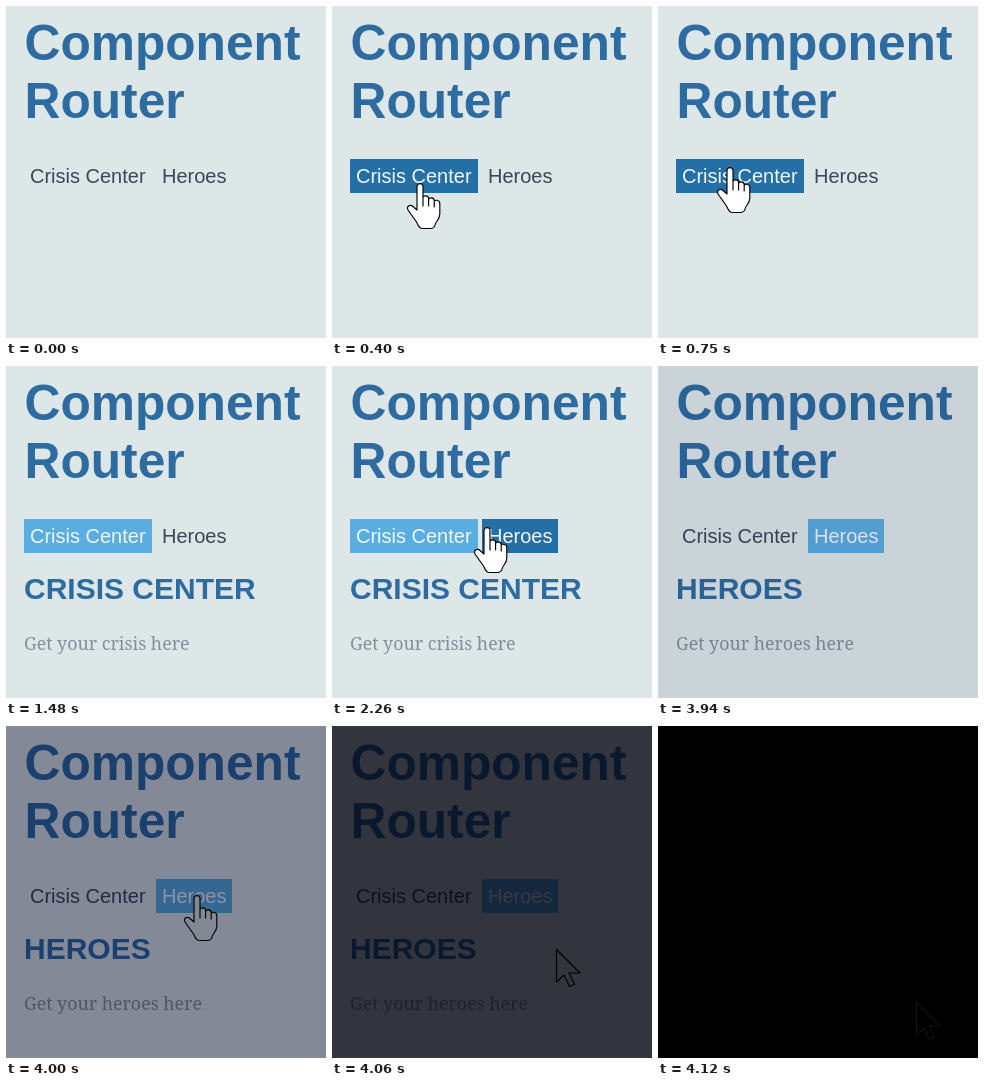
Recreate the animation shown at these times as an HTML page. Size 320 by 332 pixels, loop 4320 ms.

```html
<!DOCTYPE html>
<html lang="en">
<head>
<meta charset="utf-8">
<title>Component Router</title>
<style>
  html, body { margin: 0; width: 100%; height: 100%; overflow: hidden; background: #dde7e7; }
  svg { display: block; width: 320px; height: 332px; font-family: "Liberation Sans", Arial, sans-serif; }
  .head { font-weight: bold; fill: #2d6ba1; }
  .title { font-size: 49.7px; }
  .page { font-size: 30px; }
  .note { font: 17.8px "Noto Serif", Cambria, serif; fill: #83909c; }
  .link { font-size: 20px; fill: #3c4658; }
  .link rect { fill: none; }
  .link.hover, .link.active { fill: #f1f6fa; }
  .link.hover rect { fill: #2470a6; }
  .link.active rect { fill: #5aade0; }
  #cursor path { stroke-width: 1.15; stroke-linejoin: round; stroke-linecap: round; }
</style>
</head>
<body>
<svg viewBox="0 0 320 332">
  <rect width="320" height="332" fill="#dde7e7"/>
  <g class="head title">
    <text x="18.5" y="54">Component</text>
    <text x="18.5" y="112">Router</text>
  </g>
  <g class="link"><rect x="18" y="153" width="128" height="34"/><text x="24" y="177">Crisis Center</text></g>
  <g class="link"><rect x="150" y="153" width="76" height="34"/><text x="156" y="177">Heroes</text></g>
  <text id="page" class="head page" x="18" y="232.5"></text>
  <text id="note" class="note" x="18" y="284"></text>
  <rect id="shade" width="320" height="332" opacity="0"/>
  <g id="cursor">
    <path id="arrow" d="M.5 .5V33L8 26L13.5 37.5L18.5 35.2L13 24H24Z"/>
    <path id="hand" transform="translate(-13.5 0)" d="M10.5 27V3.6a3 3 0 0 1 6 0V15c0-3 5.6-3 5.6.6V17c0-3 5.6-2.8 5.6.8V19c0-2.6 5.6-2.4 5.6 1.4V31c0 6-4 7-4.6 10.500c-.6 3-2 4-5 4H16c-4 0-4-3-6-6.500L1.500 27c-2-4 2.500-6 5-3.500ZM16.500 15v8M22.100 17v6M27.700 19v5"/>
  </g>
</svg>
<script>
const LOOP = 4320, STEP = 30, FADE = 3940;
const $ = id => document.getElementById(id);

// time, x, y of the pointer tip
const track = [
  [0, 223, 295], [30, 223, 295], [180, 160, 240], [330, 100, 187], [450, 76, 166], [550, 71, 161],
  [749, 71, 161], [750, 72, 161], [2050, 72, 161],
  [2080, 76, 157], [2140, 98, 146], [2260, 154.5, 161], [2400, 184, 162], [2540, 187.5, 162],
  [3970, 187.5, 162], [4000, 190.5, 169], [4120, 258, 276], [LOOP, 258, 276]
];
const shown = [[30, 1180], [2080, 2640], [3970, LOOP]];
const pages = [
  { start: 1480, head: "CRISIS CENTER", note: "Get your crisis here" },
  { start: 2940, head: "HEROES", note: "Get your heroes here" }
];
const links = [...document.querySelectorAll(".link")].map(el => {
  const r = el.firstChild;
  return { el, x: +r.getAttribute("x"), w: +r.getAttribute("width") };
});

function pointer(t) {
  const i = track.findIndex(k => k[0] > t) - 1;
  const [t0, x0, y0] = track[i], [t1, x1, y1] = track[i + 1];
  const p = Math.floor((t - t0) / STEP) * STEP / (t1 - t0);
  return [Math.round(x0 + (x1 - x0) * p), Math.round(y0 + (y1 - y0) * p)];
}

// seven steps to black, slow at both ends
function darkness(t) {
  if (t < FADE) return 0;
  const p = Math.min(1, (Math.floor((t - FADE) / STEP) + 1) / 7);
  return 1 - (1 - p ** 1.5) ** 1.6;
}

function draw(t) {
  const [x, y] = pointer(t);
  const current = pages.filter(p => t >= p.start).length - 1;
  const over = links.findIndex(l => x >= l.x && x < l.x + l.w && y >= 153 && y < 187);
  links.forEach(({ el }, i) => {
    el.classList.toggle("active", i === current);
    el.classList.toggle("hover", i === over && i !== current);
  });

  const page = pages[current] || { head: "", note: "" };
  $("page").textContent = page.head;
  $("note").textContent = page.note;

  const dark = darkness(t), lit = 1 - dark;
  $("shade").setAttribute("opacity", dark);
  $("shade").setAttribute("fill", `rgb(0,0,${60 * lit})`);

  const cursor = $("cursor");
  cursor.setAttribute("visibility", shown.some(([a, b]) => t >= a && t < b) ? "visible" : "hidden");
  cursor.setAttribute("transform", `translate(${x} ${y})`);
  cursor.setAttribute("fill", dark ? `rgb(${221 * lit},${231 * lit},${250 * lit})` : "#fff");
  cursor.setAttribute("stroke", dark === 1 ? "#131313" : "#000");
  $("hand").style.display = over < 0 ? "none" : "";
  $("arrow").style.display = over < 0 ? "" : "none";
}

const begin = performance.now();
function tick() {
  draw((performance.now() - begin) % LOOP);
  requestAnimationFrame(tick);
}
draw(0);
requestAnimationFrame(tick);
</script>
</body>
</html>
```
